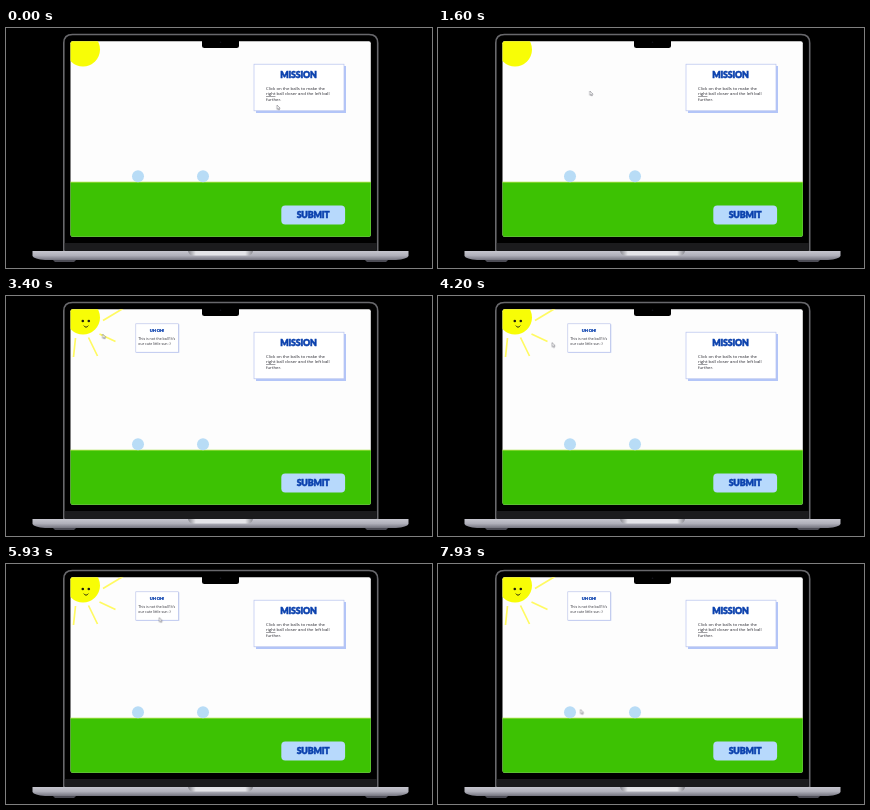
Animation, 426 px wide and 240 px high, one loop 8000 ms. Source, as an HTML page:

```html
<!DOCTYPE html>
<html lang="en">
<head>
<meta charset="utf-8">
<title>Ball mission</title>
<style>
  html, body { margin: 0; width: 100%; height: 100%; overflow: hidden; background: #000; }
  svg { display: block; width: 100%; height: 100%; }
  .title { font-family: Lato, sans-serif; font-weight: 900; fill: #0a40ad; stroke: #0a40ad; text-anchor: middle; }
  .big { font-size: 8.8px; letter-spacing: -.2px; stroke-width: .5px; }
  .small { font-size: 4.2px; letter-spacing: -.15px; stroke-width: .2px; }
  .body { font-family: "Open Sans", sans-serif; font-size: 4.33px; fill: #26262e; }
  .note { font-size: 3.6px; }
  .underline { text-decoration: underline; }
  #awake, #hand { opacity: 0; }
</style>
</head>
<body>
<svg viewBox="0 0 426 240" preserveAspectRatio="none">
  <defs>
    <clipPath id="screen"><rect x="64.5" y="13.3" width="300.3" height="195.5" rx="2"/></clipPath>
    <linearGradient id="metal" x1="0" y1="0" x2="0" y2="1">
      <stop offset="0" stop-color="#c6c6ce"/>
      <stop offset=".5" stop-color="#b0b0ba"/>
      <stop offset="1" stop-color="#74747f"/>
    </linearGradient>
    <linearGradient id="scoop">
      <stop offset="0" stop-color="#85858c"/>
      <stop offset=".12" stop-color="#e4e4e8"/>
      <stop offset=".88" stop-color="#e4e4e8"/>
      <stop offset="1" stop-color="#85858c"/>
    </linearGradient>
  </defs>

  <!-- laptop lid -->
  <path d="M57.8 223V15Q57.8 6.5 66.5 6.5H363Q371.7 6.5 371.7 15V223Z" fill="#000" stroke="#68686c" stroke-width="1.6"/>
  <rect x="58.8" y="215" width="312" height="8" fill="#1b1b1d"/>

  <g clip-path="url(#screen)">
    <rect x="64" y="13" width="302" height="197" fill="#fdfdfd"/>
    <rect x="64" y="154" width="302" height="56" fill="#3dc203"/>
    <path d="M64 154.2H366" stroke="#a5df45" stroke-width=".9"/>
    <g fill="#b8dcf6">
      <circle cx="132" cy="148.2" r="6"/>
      <circle cx="197" cy="148.2" r="6"/>
    </g>
    <circle cx="77" cy="21.5" r="17" fill="#f8fd06"/>

    <g id="awake">
      <path d="M97 24.5L117 12.5M93.5 38L109.5 45.5M82.5 41.5L91.5 60M69.5 42L67.5 61" stroke="#fffa62" stroke-width="1.7" fill="none"/>
      <circle cx="76.8" cy="25" r="1.3" fill="#1c1c10"/>
      <circle cx="82.8" cy="25" r="1.3" fill="#1c1c10"/>
      <path d="M77.8 29.6Q80 32.8 82.3 29.6" stroke="#1c1c10" stroke-width=".9" fill="none"/>
      <rect x="130.3" y="28.3" width="43" height="28.5" fill="#c3d0f4"/>
      <rect x="129.8" y="27.8" width="42.6" height="28.4" fill="#fff" stroke="#b3bde8" stroke-width=".6"/>
      <text class="title small" x="151" y="36.2">UH OH!</text>
      <text class="body note" x="132.3" y="44.3">This is not the ball! It's</text>
      <text class="body note" x="132.3" y="49">our cute little sun :)</text>
    </g>

    <rect x="250" y="38" width="90" height="47" fill="#b3c5f8"/>
    <rect x="248" y="36.2" width="90" height="46.6" fill="#fff" stroke="#b7c3ef" stroke-width=".7"/>
    <text class="title big" x="292.4" y="50.2">MISSION</text>
    <text class="body" x="260" y="62.1">Click on the balls to make the</text>
    <text class="body" x="260" y="67.4"><tspan class="underline">right</tspan> ball closer and the left ball</text>
    <text class="body" x="260" y="72.7">further.</text>

    <rect x="275.3" y="177.5" width="63.8" height="19" rx="4" fill="#b7d9fc"/>
    <text class="title big" x="307" y="190.1">SUBMIT</text>

    <g id="cursor">
      <path id="arrow" d="M0 0V4.4L1.1 3.5L1.8 5L2.5 4.7L1.8 3.2H3.2Z" fill="#fff" stroke="#55555f" stroke-width=".45"/>
      <path id="hand" d="M.4 3V.6Q.9 -.1 1.4 .6V2.1L3.4 2.6Q4 2.8 3.8 3.6L3.2 5.6H1L-.7 3.4Q-.3 2.6 .4 3.4Z" fill="#fff" stroke="#666670" stroke-width=".5"/>
    </g>
  </g>

  <!-- camera notch, base and feet -->
  <path d="M196 12.5H233V17.5Q233 20 230.5 20H198.5Q196 20 196 17.5Z" fill="#000"/>
  <circle cx="214.5" cy="14.2" r=".8" fill="#15151d"/>
  <path d="M46 231H71L68 234H49ZM358 231H383L380 234H361Z" fill="#4c4c55"/>
  <path d="M26.5 223H402.5V228Q401 231 390 232H39Q28 231 26.5 228Z" fill="url(#metal)"/>
  <path d="M182 223H247Q246 227.500 241 227.500H188Q183 227.500 182 223Z" fill="url(#scoop)"/>
</svg>
<script>
  const LOOP = 8000;

  function play(id, frames, easing = "linear") {
    document.getElementById(id).animate(
      frames.map(([time, style]) => ({ ...style, offset: time / LOOP, easing })),
      { duration: LOOP, iterations: Infinity }
    ).startTime = 0;
  }

  // Time in ms, then the pointer tip.
  const path = [
    [0, 271, 77], [500, 268, 78], [1400, 156, 65], [1600, 151.8, 63],
    [1900, 138, 58], [2450, 86, 32], [2600, 83.8, 30.5], [3100, 84, 31],
    [3700, 109, 45], [4200, 114, 46.5], [4700, 121, 48], [5500, 150, 53],
    [5930, 153.2, 53.5], [6250, 157, 60], [6930, 182, 109],
    [7250, 181, 117], [7930, 142.5, 145.5], [8000, 142, 145.5]
  ];
  play("cursor", path.map(([t, x, y]) => [t, { transform: `translate(${x}px, ${y}px)` }]), "ease-in-out");

  // Hard switch from one opacity to the other at `from`, and back at `to`.
  function showBetween(id, from, to, inside = 1) {
    const on = { opacity: inside }, off = { opacity: 1 - inside };
    const end = to < LOOP ? off : on;
    play(id, [[0, off], [from, on], [to, end], [LOOP, end]], "step-end");
  }
  showBetween("awake", 2870, LOOP);
  showBetween("hand", 2400, 3330);
  showBetween("arrow", 2400, 3330, 0);
</script>
</body>
</html>
```
